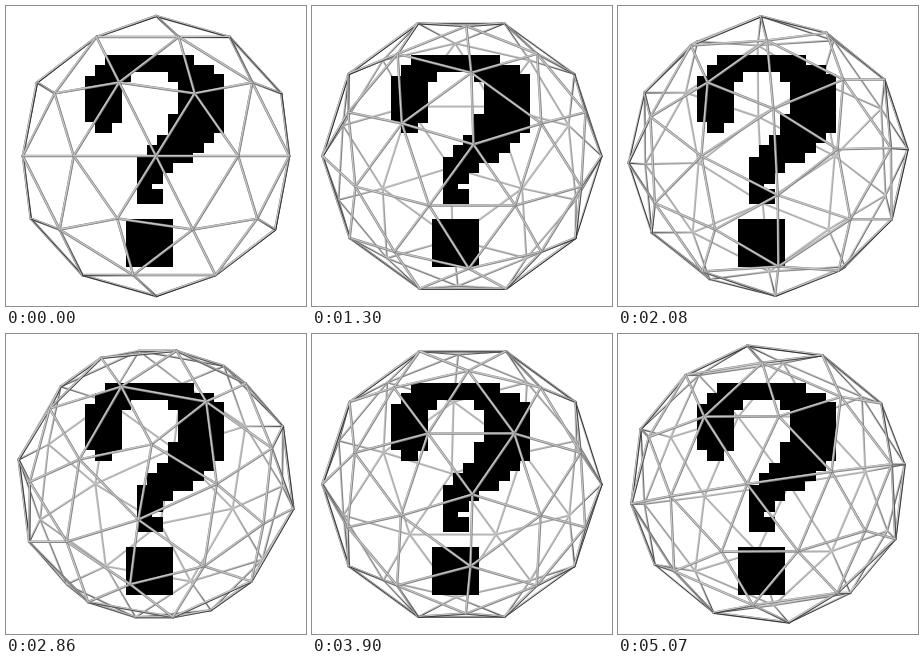
These frames come from a looping animation (300 px wide and 300 px high, 5.2 s). An HTML page with a canvas:

```html
<!DOCTYPE html>
<html lang="en">
<head>
<meta charset="utf-8">
<title>Question sphere</title>
<style>
html, body { margin: 0; width: 100%; height: 100%; overflow: hidden; background: #fff; }
canvas { display: block; }
</style>
</head>
<body>
<canvas id="stage" width="300" height="300"></canvas>
<script>
const ctx = document.getElementById('stage').getContext('2d');
const STEP = 130, STEPS = 40, RADIUS = 140, CENTRE = 150;

// Geodesic sphere: icosahedron corners plus edge midpoints pushed out to the sphere.
// x is right, y is away from the viewer, z is up.
const dist = (a, b) => Math.hypot(a[0] - b[0], a[1] - b[1], a[2] - b[2]);
const pairs = (list, reach) => list.flatMap((a, i) =>
  list.slice(i + 1).filter(b => dist(a, b) < reach).map(b => [a, b]));

const corners = [[0, 0, 1], [0, 0, -1]];
const h = 1 / Math.sqrt(5);
for (let i = 0; i < 5; i++) {
  const az = (18 + 72 * i) * Math.PI / 180;
  const x = 2 * h * Math.sin(az), y = -2 * h * Math.cos(az);
  corners.push([x, y, h], [-x, -y, -h]);
}
const middles = pairs(corners, 1.1).map(([a, b]) => {
  const sum = a.map((v, i) => v + b[i]);
  const len = Math.hypot(...sum);
  return sum.map(v => v / len);
});
const edges = pairs([...corners, ...middles], 0.7);

// The first half turn takes 19 steps, the second 21.
const angleAt = k => Math.PI * (k < 19 ? k / 19 : 1 + (k - 19) / 21);

// Equal turns about the viewing axis, then about the vertical.
function project([x, y, z], a) {
  const c = Math.cos(a), s = Math.sin(a);
  const x1 = x * c + z * s;
  return {
    x: CENTRE + RADIUS * (x1 * c - y * s),
    y: CENTRE - RADIUS * (z * c - x * s),
    depth: x1 * s + y * c
  };
}

function line(p, q, width, colour, shift = 0) {
  ctx.lineWidth = width;
  ctx.strokeStyle = colour;
  ctx.beginPath();
  ctx.moveTo(p.x + shift, p.y + shift);
  ctx.lineTo(q.x + shift, q.y + shift);
  ctx.stroke();
}

// Struts darken towards the rim of the sphere.
function rimShade(p, q) {
  const fade = ctx.createLinearGradient(p.x, p.y, q.x, q.y);
  [p, q].forEach((end, i) =>
    fade.addColorStop(i, `rgba(0,0,0,${Math.max(0.15, 0.9 - 1.2 * Math.abs(end.depth))})`));
  return fade;
}

function strut({ p, q, depth }) {
  if (depth > 0.02) {
    line(p, q, 2.2, '#c4c4c4');
    line(p, q, 0.9, rimShade(p, q), 0.4);
  } else {
    line(p, q, 2.5, '#858585');
    line(p, q, 1.2, '#cacaca', -0.3);
    if (depth > -0.3) line(p, q, 0.8, rimShade(p, q), 0.6);
  }
}

const hook = new Path2D(`M99 49H188V59H208V68H218V127H208V137H198V147H187V157H167V167H157
  V178H146V183H157V198H131V151H141V139H151V129H162V108H172V76H162V66H125V76H116V117H106V127
  H89V116H79V70H89V59H99Z`);

function draw(k) {
  const a = angleAt(k);
  const struts = edges.map(([u, v]) => {
    const p = project(u, a), q = project(v, a);
    return { p, q, depth: (p.depth + q.depth) / 2 };
  }).sort((m, n) => n.depth - m.depth);

  ctx.fillStyle = '#fff';
  ctx.fillRect(0, 0, 300, 300);
  ctx.lineCap = 'round';
  struts.filter(e => e.depth > 0.02).forEach(strut);
  ctx.fillStyle = '#000';
  ctx.fill(hook);
  ctx.fillRect(120, 213, 47, 48);
  struts.filter(e => e.depth <= 0.02).forEach(strut);
}

const start = performance.now();
function tick() {
  draw(Math.floor((performance.now() - start) / STEP) % STEPS);
  requestAnimationFrame(tick);
}
tick();
</script>
</body>
</html>
```
